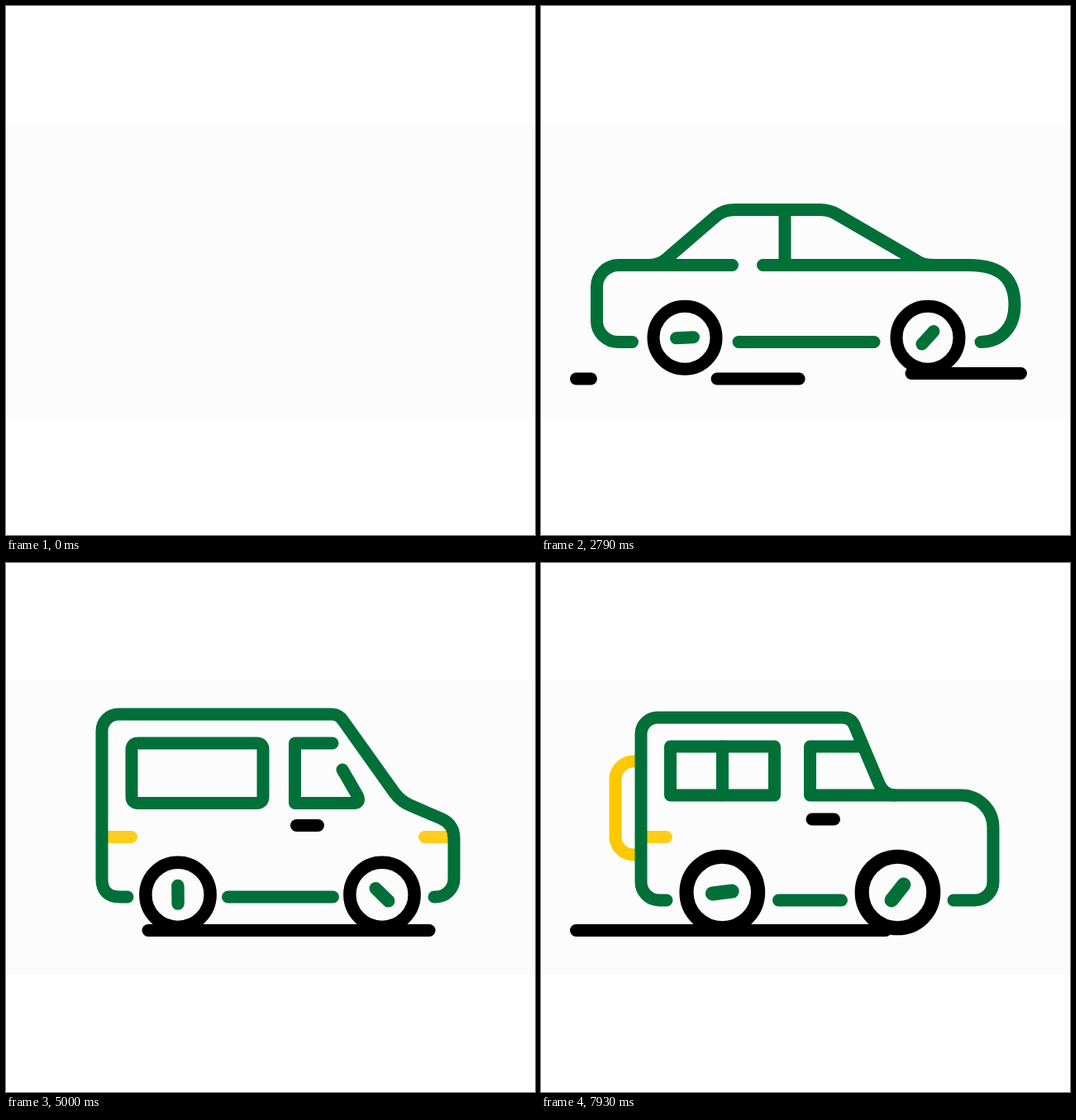
Animation, 640 px wide and 640 px high, one loop 8000 ms. Source, as an HTML page:

```html
<!DOCTYPE html>
<html>
<head>
<meta charset="utf-8">
<style>
  html, body { margin: 0; width: 100%; height: 100%; overflow: hidden; background: #fff; }
  svg { display: block; width: 100vw; height: 100vh; }
  path { fill: none; stroke-width: 15; stroke-linecap: round; stroke-linejoin: round; }
</style>
</head>
<body>
<svg id="stage" viewBox="0 0 640 640">
  <rect y="141" width="640" height="357" fill="#fcfcfc"/>
</svg>
<script>
const LOOP = 8000, GREEN = '#007038', YELLOW = '#ffc800';
const stage = document.getElementById('stage');

function add(parent, tag, attrs) {
  const node = document.createElementNS('http://www.w3.org/2000/svg', tag);
  for (const name in attrs) node.setAttribute(name, attrs[name]);
  return parent.appendChild(node);
}

const clamp = x => Math.min(1, Math.max(0, x));
const ease = x => x < .5 ? 2 * x * x : 1 - 2 * (1 - x) ** 2;
const ramp = (t, from, to) => ease(clamp((t - from) / (to - from)));

// Linear interpolation through [time, value] pairs, held at both ends.
function along(keys, t) {
  if (t <= keys[0][0]) return keys[0][1];
  for (let i = 1; i < keys.length; i++) {
    const [t0, v0] = keys[i - 1], [t1, v1] = keys[i];
    if (t <= t1) return v0 + (v1 - v0) * (t - t0) / (t1 - t0);
  }
  return keys[keys.length - 1][1];
}

// drawn: ms until a stroke is complete; wait: delay before it is erased;
// fromStart: erase from the beginning of the path.
const cars = [
  {
    start: 0, fadeOut: 2904, end: 3430, drawn: 700,
    lights: ['M67 344H93', 'M536 344H566'],
    strokes: [
      { d: 'M110.5 406.5H93A25.5 25.5 0 0 1 67.5 381V340A26.5 26.5 0 0 1 94 313.5H231.5' },
      { d: 'M131 313.5Q145 313 154 304L212 254Q221 246.5 235 246.5H338Q349 246.5 358 252L456 309Q463 313.5 476 313.5' },
      { d: 'M268.5 313.5H518C555 313.5 573 329 573 362C573 390 555 406.5 532 406.5', drawn: 1000 },
      { d: 'M295 246.5V313.5' },
      { d: 'M239 406.5H403' }
    ]
  },
  {
    start: 3430, fadeOut: 6334, end: 6860, drawn: 860,
    lights: ['M116 331.5H151.5', 'M506.5 331.5H533'],
    handle: 'M351.5 317.5H377.5',
    strokes: [
      { d: 'M518 404H520A22 22 0 0 0 542 382V333Q542 316 526 309L491 294Q478 289 470 278L408 191Q403 183 394 183H136A20 20 0 0 0 116 203V382Q116 404 138 404H147', fromStart: true },
      { d: 'M303 290.5Q311 290.5 311 282.5V226Q311 218 303 218H160Q152 218 152 226V282.5Q152 290.5 160 290.5Z' },
      { d: 'M407 250L425.5 282Q429 290.5 420 290.5H349.5V218H395' },
      { d: 'M395.5 404H268.5', drawn: 470, wait: 170 }
    ]
  },
  {
    start: 6860, fadeOut: 9000, end: 9500, drawn: 940,
    lights: ['M121 331.5H151.5'],
    handle: 'M328 310H354.5',
    strokes: [
      { d: 'M121 240H112A22 22 0 0 0 90 262V331A22 22 0 0 0 112 353H121', color: YELLOW },
      { d: 'M499 408H525A22 22 0 0 0 547 386V320A39 39 0 0 0 508 281H428Q415 281 409 267L379 196Q375 187 364 187H141A20 20 0 0 0 121 207V386A22 22 0 0 0 143 408H152' },
      { d: 'M282.5 281V222H156.5V281Z' },
      { d: 'M219.5 222V281' },
      { d: 'M387 222H325.5V281H428' },
      { d: 'M363.5 408H287.5', drawn: 470 }
    ]
  }
];

const road = add(stage, 'g', { stroke: '#000' });

for (const car of cars) {
  car.group = add(stage, 'g', {});
  car.lightNodes = car.lights.map(d => add(car.group, 'path', { d, stroke: YELLOW }));
  for (const s of car.strokes)
    s.node = add(car.group, 'path', { d: s.d, stroke: s.color || GREEN, pathLength: 1 });
  if (car.handle) add(car.group, 'path', { d: car.handle, stroke: '#000' });
}

// Edges of the road strips over one road cycle.
const ROAD_CYCLE = 953.3;
const strips = [
  { y: 451, left: [[-218, 605], [0, 124], [55, 35]], right: [[-150, 605], [-140, 585], [0, 420], [70, 288], [190, 35]] },
  { y: 451, left: [[10, 605], [70, 477], [240, 35]], right: [[50, 605], [70, 573], [267, 95], [295, 35]] },
  { y: 444.5, left: [[100, 588], [267, 257], [476, 168], [545, 35]], right: [[267, 588], [339, 556], [476, 522], [549, 423], [735, 35]] }
];
for (const s of strips) s.node = add(road, 'path', {});

const wheels = [0, 1].map(() => {
  const group = add(stage, 'g', {});
  return {
    group,
    spoke: add(group, 'path', { d: 'M-10.5 0H10.5', stroke: GREEN }),
    ring: add(group, 'circle', { r: 38, fill: 'none', stroke: '#000', 'stroke-width': 15 })
  };
});

const spinKeys = [[0, -221], [710, 104], [1930, 697], [3570, 1421], [5000, 2069], [6500, 2755], [8000, 3445]];
const bodyScale = [[0, 1], [300, 1.11], [710, 1.018], [860, 1]];
const wheelScale = [[0, 0], [250, 1.1], [710, 1.02], [930, 1], [4400, 1], [5000, 1.03], [5600, 1], [6500, 1.01], [6860, 1], [7140, 1.14]];

function show(node, visible) {
  node.style.display = visible ? '' : 'none';
}

function drawCar(car, t, light) {
  const age = t - car.start;
  show(car.group, t >= 70 && age >= 0 && t < car.end);
  for (const node of car.lightNodes) {
    show(node, age > 500);
    node.setAttribute('stroke-opacity', light);
  }
  for (const s of car.strokes) {
    const grown = ramp(age, 0, s.drawn || car.drawn);
    const erased = ramp(t, car.fadeOut + (s.wait || 0), car.end);
    const from = s.fromStart ? erased : 0;
    const to = s.fromStart ? grown : grown - erased;
    show(s.node, to - from > .001);
    s.node.style.strokeDasharray = to - from >= 1 ? 'none' : `${Math.max(to - from, 0)} 2`;
    s.node.style.strokeDashoffset = -from;
  }
}

function drawRoad(t) {
  let phase = (t - 710 + 10 * ROAD_CYCLE) % ROAD_CYCLE;
  strips.forEach((s, i) => {
    const p = i === 0 && phase > 600 ? phase - ROAD_CYCLE : phase;
    const left = along(s.left, p), right = along(s.right, p);
    show(s.node, t >= 70 && right - left > 1);
    s.node.setAttribute('d', `M${left + 7.5} ${s.y}H${Math.max(right - 7.5, left + 7.6)}`);
  });
}

function drawWheels(t, spin) {
  const toVan = ramp(t, 3430, 3710), toJeep = ramp(t, 6860, 7140);
  const xs = [174 + 34 * toVan + 11.3 * toJeep, 468 - 13 * toVan - 23.5 * toJeep];
  const y = 401.3 - 2.8 * toJeep;
  wheels.forEach((w, i) => {
    show(w.group, t >= 70);
    w.group.setAttribute('transform', `translate(${xs[i]} ${y}) scale(${along(wheelScale, t)})`);
    w.spoke.setAttribute('transform', `rotate(${spin - 45 * i})`);
  });
}

function render(now) {
  const t = now % LOOP;
  const spin = along(spinKeys, t);
  const light = .5 + .5 * Math.cos(2 * Math.PI * (spin - 2755) / 134.3);
  for (const car of cars) drawCar(car, t, light);
  const k = along(bodyScale, t);
  cars[0].group.setAttribute('transform', `translate(315 313.5) scale(${k}) translate(-315 -313.5)`);
  drawRoad(t);
  drawWheels(t, spin);
}

const began = performance.now();
function tick() {
  render(performance.now() - began);
  requestAnimationFrame(tick);
}
tick();
</script>
</body>
</html>
```
